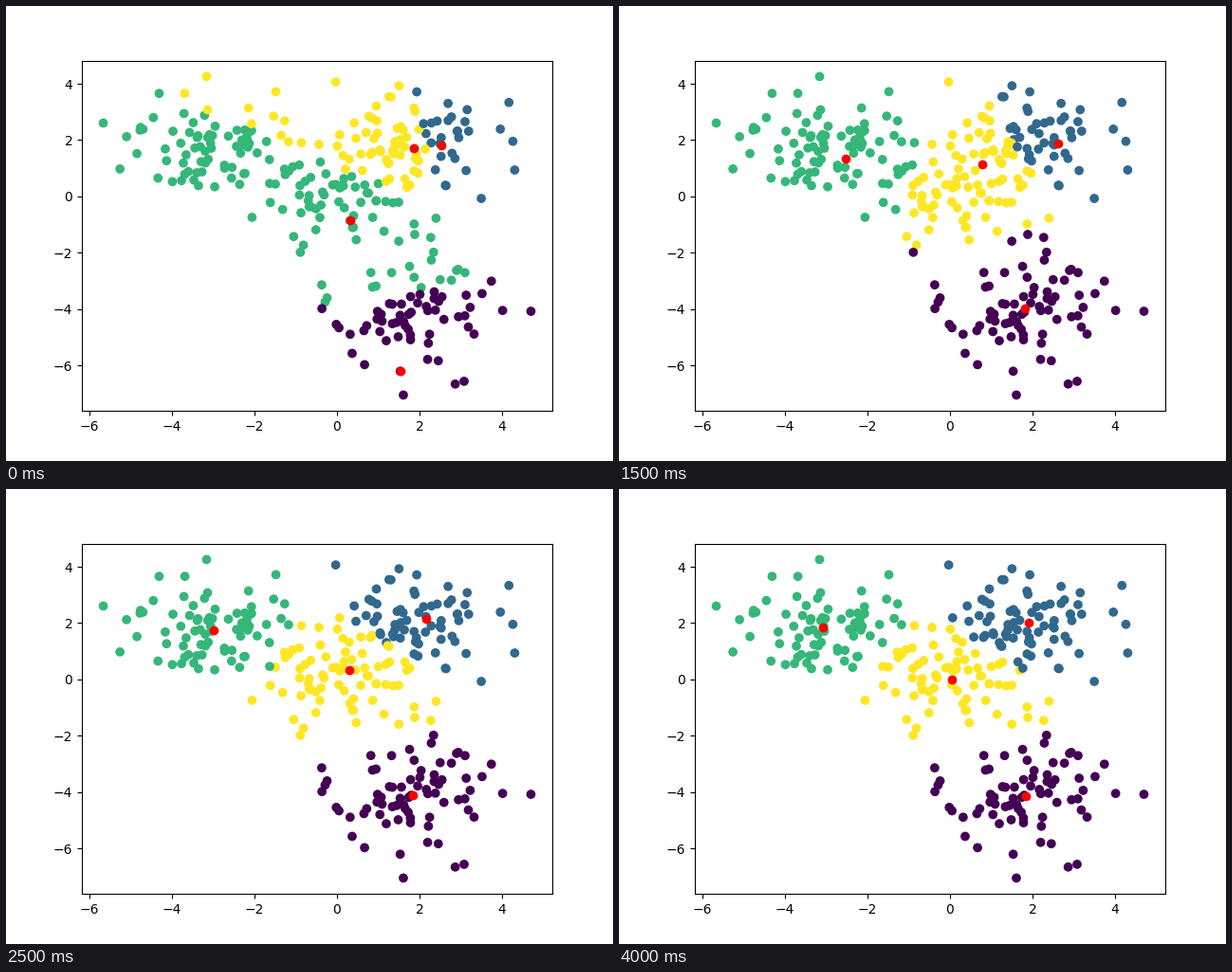
These frames come from a looping animation (640x480 px, 4.5 s). A matplotlib script:

```python
import numpy as np
import matplotlib.pyplot as plt
from matplotlib.animation import FuncAnimation

STEPS = 9
BLOBS = [(0, 0), (2, 2), (-3, 2), (2, -4)]
SEEDS = [(1.54, -6.2), (2.53, 1.81), (0.32, -0.86), (1.87, 1.69)]


def make_points(per_blob=75):
    rng = np.random.RandomState(0)
    pts = np.concatenate([rng.normal(c, 1.0, (per_blob, 2)) for c in BLOBS])
    order = np.arange(len(pts))
    rng.shuffle(order)
    return pts[order]


def distances(a, b):
    return np.linalg.norm(a[:, None] - b[None], axis=2)


def run_kmeans(pts):
    """Return (centers, labels) for every step, starting at data points."""
    centers = pts[distances(np.array(SEEDS), pts).argmin(axis=1)]
    history = []
    for _ in range(STEPS):
        labels = distances(pts, centers).argmin(axis=1)
        history.append((centers, labels))
        centers = np.array([pts[labels == k].mean(axis=0)
                            for k in range(len(centers))])
    return history


points = make_points()
history = run_kmeans(points)

fig, ax = plt.subplots(figsize=(6.4, 4.8), dpi=100)
dots = ax.scatter(points[:, 0], points[:, 1], c=history[0][1],
                  cmap="viridis", vmin=0, vmax=3)
means = ax.scatter(history[0][0][:, 0], history[0][0][:, 1], c="r")


def update(step):
    centers, labels = history[step]
    dots.set_array(labels)
    means.set_offsets(centers)
    return dots, means


anim = FuncAnimation(fig, update, frames=STEPS, interval=500,
                     repeat=True, repeat_delay=0)
plt.show()
```
